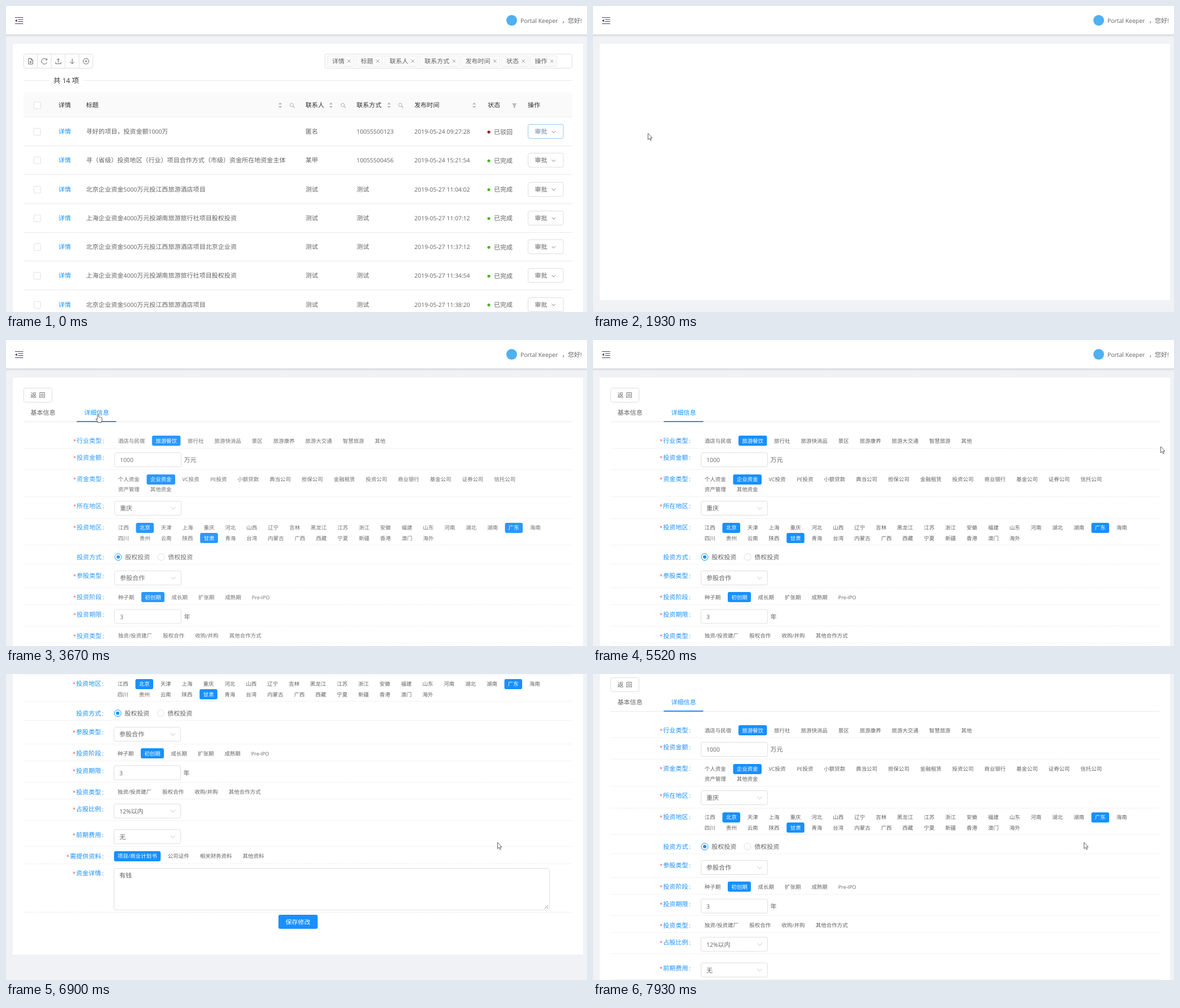
An HTML page that plays this animation: 1030x544 px, repeating every 8 s.

```html
<!DOCTYPE html>
<html lang="zh-CN">
<head>
<meta charset="utf-8">
<title>项目审批</title>
<style>
html, body { margin: 0; width: 100%; height: 100%; overflow: hidden; background: #f0f2f5; }
svg { display: block; width: 1030px; height: 544px; }
text { font-family: "Open Sans", "Noto Sans CJK SC", "Noto Sans CJK", sans-serif; text-rendering: geometricPrecision; white-space: pre; }
</style>
</head>
<body>
<svg id="stage" viewBox="0 0 1030 544" xmlns="http://www.w3.org/2000/svg"></svg>
<script>
const LOOP = 8000;
const BLUE = '#1890ff', INK = '#636363', DARK = '#303030', EDGE = '#dedede', LINE = '#e9e9e9';
const BASE = 11.06, SMALL = 9.48, LATIN = 0.945;

// y is the vertical middle of the text; Latin runs are set a little smaller than Chinese
function text(x, y, s, fill = INK, size = BASE, extra = '') {
  const runs = s.replace(/[!-~]+( [!-~]+)*/g, run => `<tspan font-size="${(size * LATIN).toFixed(2)}">${run}</tspan>`);
  return `<text x="${x}" y="${(y + size * 0.37).toFixed(2)}" font-size="${size}" fill="${fill}" ${extra}>${runs}</text>`;
}
const box = (x, y, w, h, fill = '#fff', stroke = EDGE, r = 3, extra = '') =>
  `<rect x="${x}" y="${y}" width="${w}" height="${h}" rx="${r}" fill="${fill}" stroke="${stroke}" ${extra}/>`;
const path = (d, stroke = INK, width = 1, extra = '') =>
  `<path d="${d}" fill="none" stroke="${stroke}" stroke-width="${width}" ${extra}/>`;
const at = (x, y, s) => `<g transform="translate(${x} ${y})">${s}</g>`;
const hline = (y, x1 = 31, x2 = 1004, color = LINE, extra = '') => path(`M${x1} ${y}H${x2}`, color, 1, extra);
const chevron = (x, y, color = '#c4c4c4', r = 4) =>
  path(`M${x - r} ${y - r / 2}l${r} ${r * 1.1}l${r} ${-r * 1.1}`, color, 1);
const checkbox = y => box(49.5, y, 12, 12, '#fff', '#e2e2e2', 1.5);

function header() {
  const bars = path('M16 20.5H30.5M21.5 24H30.5M21.5 27.5H30.5M16 31.5H30.5', '#4a3d55', 1.2) +
    '<path d="M16 26l3.6 -2.6v5.2z" fill="#4a3d55"/>';
  return '<rect y="50" width="1030" height="5" fill="url(#shade)"/>' +
    '<rect width="1030" height="50.5" fill="#fff"/>' + bars +
    '<circle cx="896.5" cy="25.5" r="9.5" fill="#4fb0f2"/>' +
    text(912, 25.5, 'Portal Keeper') + text(985.5, 25.5, '，') + text(996, 25.5, '您好!');
}

function toolbar() {
  const icons = [
    path('M-3.5 -5H1L4 -2V5H-3.5ZM1 -5V-2H4M-1.8 1.4H2.2M.2 -.6V3.4'),
    path('M4 -2.8A5 5 0 1 0 4.6 2M4.6 -5V-2.2H1.8'),
    path('M0 2.5V-4.5M-2.6 -2L0 -4.6L2.6 -2M-4.7 1.5V4.5H4.7V1.5'),
    path('M0 -4.5V4.5M-3.8 .8L0 4.6L3.8 .8'),
    path('M-1.9 -1.9L1.9 1.9M1.9 -1.9L-1.9 1.9') + `<circle r="5" fill="none" stroke="${INK}"/>`
  ];
  return box(31.5, 85.5, 122.5, 25) + icons.map((icon, i) =>
    (i ? path(`M${31 + i * 24.6} 85.5V110.5`, EDGE) : '') + at(43.5 + i * 24.6, 98.2, icon)).join('');
}

function columnPicker() {
  const tags = [['详情', 569], ['标题', 620], ['联系人', 671], ['联系方式', 733], ['发布时间', 805.5], ['状态', 878], ['操作', 928.5]];
  return box(565.5, 85.5, 438, 25) + tags.map(([s, x]) => {
    const w = s.length * BASE + 25.5;
    return box(x + .5, 88.5, w, 19, '#fafafa', '#ececec', 2) + text(x + 8.9, 98.3, s) +
      at(x + w - 8.5, 98, path('M-2.6 -2.6L2.6 2.6M2.6 -2.6L-2.6 2.6', '#888', .9));
  }).join('');
}

function tableHead() {
  const heads = [['详情', 93], ['标题', 142], ['联系人', 531], ['联系方式', 621.5], ['发布时间', 724], ['状态', 854], ['操作', 925]];
  const sorter = x => `<path d="M${x - 3.3} 175l3.3 -3.6l3.3 3.6zM${x - 3.3} 178l3.3 3.6l3.3 -3.6z" fill="#bbb"/>`;
  const search = x => `<circle cx="${x - 1}" cy="175.8" r="3" fill="none" stroke="#b0b0b0"/>` + path(`M${x + 1.2} 178l3 3`, '#b0b0b0', 1.1);
  return '<rect x="31" y="154" width="973" height="43" rx="3" fill="#fafafa"/>' + hline(197) + checkbox(170.5) +
    heads.map(([s, x]) => text(x, 176.3, s, DARK)).join('') +
    [486, 576, 679, 830].map(sorter).join('') + [507.5, 598, 700].map(search).join('') +
    '<path d="M897 173h8.6l-2.8 4.2v3.8h-3v-3.8z" fill="#bbb"/>';
}

function tableRow([title, person, phone, date], i) {
  const y = 223 + i * 51.25, done = i > 0;
  const top = Math.round(y - 13) + .5;
  return checkbox(Math.round(y - 6) + .5) + text(93, y, '详情', BLUE) + text(142, y, title) +
    text(531, y, person) + text(621.5, y, phone) + text(724, y, date) +
    `<circle cx="856" cy="${y + 1}" r="2.6" fill="${done ? '#4fb324' : '#8b1f1f'}"/>` +
    text(865, y + .5, done ? '已完成' : '已驳回') +
    box(925.5, top, 62.5, 25, '#fff', EDGE, 3, done ? '' : 'id="firstBtn"') +
    text(937.5, y, '审批', INK, BASE, done ? '' : 'id="firstTxt"') + chevron(970.8, y + .7, '#808080', 3.2) +
    hline(Math.round(y + 25) + .5);
}

function listPage() {
  const jx = '北京企业资金5000万元投江西旅游酒店项目', hn = '上海企业资金4000万元投湖南旅游旅行社项目股权投资';
  const test = (title, time) => [title, '测试', '测试', '2019-05-27 ' + time];
  const rows = [
    ['寻好的项目，投资金额1000万', '匿名', '10055500123', '2019-05-24 09:27:28'],
    ['寻（省级）投资地区（行业）项目合作方式（市级）资金所在地资金主体', '某甲', '10055500456', '2019-05-24 15:21:54'],
    test(jx, '11:04:02'), test(hn, '11:07:12'), test(jx + '北京企业资', '11:37:12'), test(hn, '11:34:54'), test(jx, '11:38:20')
  ];
  return toolbar() + columnPicker() + hline(132.5, 31, 77) + hline(132.5, 138, 1004) +
    text(84, 132.5, '共 14 项', DARK, 12.64, 'font-weight="500"') + tableHead() + rows.map(tableRow).join('');
}

const EM = { V: .62, C: .62, P: .56, E: .51, '/': .39 };
const tagWidth = s => [...s].reduce((w, c) => w + (EM[c] || 1) * SMALL, 0);

// "*" marks a chosen tag
function tags(y, list) {
  let x = 197.8;
  return list.split(' ').map(item => {
    const on = item[0] === '*', s = item.replace('*', ''), w = tagWidth(s), left = x;
    x += w + 18.96;
    return (on ? box(left - 6.3, Math.round(y - 9), w + 12.6, 18, BLUE, 'none') : '') + text(left, y, s, on ? '#fff' : INK, SMALL);
  }).join('');
}

function label(y, s, need = true) {
  const x = 124.3 - (s.length - 4) * BASE;
  return (need ? text(x - 6, y + .6, '*', '#f5474c', 9.6) : '') + text(x, y, s, BLUE) + text(170.3, y, ':', BLUE);
}

const field = (y, s, unit = '') => box(191.5, y - 12.5, 118, 25) +
  text(201, y + .3, s) + (unit ? text(314.5, y, unit) : '');
const select = (y, s) => field(y, s) + chevron(295.5, y);

function form() {
  const labels = { 行业类型: 179, 投资金额: 209, 资金类型: 247, 所在地区: 295, 投资地区: 333, 投资方式: 385.5, 参股类型: 419,
    投资阶段: 457, 投资期限: 488, 投资类型: 525.5, 占股比例: 555.8, 前期费用: 601.5, 需提供资料: 639.5, 资金详情: 670 };
  const rules = [192, 230, 278, 317, 364, 398, 440, 470, 508, 538, 576, 622, 653, 739];
  const radio = (x, color, s) => `<circle cx="${x}" cy="385.8" r="6" fill="#fff" stroke="${color}"/>` + text(x + 12.2, 385.8, s);
  return rules.map(y => hline(y + .5, 31, 1004, LINE, 'stroke-dasharray="2 1.6"')).join('') +
    Object.entries(labels).map(([s, y]) => label(y, s, s !== '投资方式')).join('') +
    tags(179, '酒店与民宿 *旅游餐饮 旅行社 旅游快消品 景区 旅游康养 旅游大交通 智慧旅游 其他') +
    field(213, '1000', '万元') +
    tags(247.5, '个人资金 *企业资金 VC投资 PE投资 小额贷款 典当公司 担保公司 金融租赁 投资公司 商业银行 基金公司 证券公司 信托公司') +
    tags(265.5, '资产管理 其他资金') + select(299, '重庆') +
    tags(333.8, '江西 *北京 天津 上海 重庆 河北 山西 辽宁 吉林 黑龙江 江苏 浙江 安徽 福建 山东 河南 湖北 湖南 *广东 海南') +
    tags(352, '四川 贵州 云南 陕西 *甘肃 青海 台湾 内蒙古 广西 西藏 宁夏 新疆 香港 澳门 海外') +
    radio(198, BLUE, '股权投资') + `<circle cx="198" cy="385.8" r="3" fill="${BLUE}"/>` + radio(274, EDGE, '债权投资') +
    select(423, '参股合作') + tags(457, '种子期 *初创期 成长期 扩张期 成熟期 Pre-IPO') + field(491.5, '3', '年') +
    tags(525.8, '独资/投资建厂 股权合作 收购/并购 其他合作方式') + select(559.5, '12%以内') + select(605.2, '无') +
    tags(639.8, '*项目/商业计划书 公司证件 相关财务资料 其他资料') +
    box(191.5, 661.5, 772, 74) + text(201, 674, '有钱') + path('M955 733l6 -6M959 733l2 -2', '#777', .9) +
    box(483, 744, 69.5, 25, BLUE, 'none') + text(495.5, 756.5, '保存修改', '#fff');
}

function detailPage() {
  return box(31.5, 85.5, 50, 25) + text(43.2, 98.3, '返') + text(58.6, 98.3, '回') + hline(145.5) +
    text(43.5, 128.8, '基本信息', INK, BASE, 'id="tabA"') + text(138.5, 128.8, '详细信息', INK, BASE, 'id="tabB"') +
    `<rect id="inkBar" y="144" width="70" height="2" fill="${BLUE}"/>` +
    `<g clip-path="url(#pane)"><g id="form">${form()}</g></g>`;
}

const cursorStyle = 'fill="#fff" stroke="#3a3a3a" stroke-width=".8" stroke-linejoin="round"';
const stage = document.getElementById('stage');
stage.innerHTML = `<defs>
  <linearGradient id="shade" x2="0" y2="1"><stop stop-color="#cfd2d6"/><stop offset="1" stop-color="#f0f2f5"/></linearGradient>
  <clipPath id="pane"><rect x="31" y="147" width="974" height="640"/></clipPath></defs>
  <rect width="1030" height="544" fill="#f0f2f5"/>
  <g id="page"><rect id="panel" x="12" y="67" width="1011" fill="#fff"/>${header()}
  <g id="list">${listPage()}</g><g id="detail">${detailPage()}</g></g>
  <g id="cursor"><path id="arrow" d="M.5 .5V11.6L3 9.2L4.8 13L6.5 12.2L4.8 8.5H8Z" ${cursorStyle}/>
  <path id="hand" d="M-1 8V.8Q0 -1 1.2 .8V5Q2.4 4 3.4 5.4Q4.6 4.6 5.4 6Q6.8 5.4 7.2 7V10.5Q7 12 6 13V14.8H-.2V13.4L-3.8 8.8Q-3.4 6.8 -1 9.2Z" ${cursorStyle}/></g>`;

const el = {};
stage.querySelectorAll('[id]').forEach(n => el[n.id] = n);
const set = (n, attrs) => { for (const k in attrs) n.setAttribute(k, attrs[k]); };
const show = (n, on) => n.setAttribute('visibility', on ? 'visible' : 'hidden');

const clamp = p => Math.max(0, Math.min(1, p));
const smooth = p => p * p * (3 - 2 * p);
const cubic = p => p < .5 ? 4 * p ** 3 : 1 - 4 * (1 - p) ** 3;
const between = (t, a, b) => t >= a && t < b;

// keys: [time, value, ...]
function track(keys, t) {
  const i = keys.findIndex(k => k[0] > t);
  if (i === 0) return keys[0].slice(1);
  if (i < 0) return keys[keys.length - 1].slice(1);
  const a = keys[i - 1], b = keys[i], p = (t - a[0]) / (b[0] - a[0]);
  return a.slice(1).map((v, j) => v + (b[j + 1] - v) * p);
}

const MOUSE = [[450, 919, 523], [800, 520, 400], [1230, 95, 257], [1400, 97, 226], [2340, 97, 226], [3190, 163, 132],
  [4070, 163, 132], [4300, 520, 215], [4450, 830, 245], [4590, 1017, 225], [5130, 1022, 175], [5220, 1022, 175],
  [5480, 1006, 189], [5540, 1006, 189], [5900, 966, 241], [6330, 966, 241], [6850, 871, 299], [7380, 871, 299], [7500, 870, 299]];
const SCROLL = [[5900, 0], [6060, 79], [6200, 156], [6290, 158], [6330, 158], [6600, 237], [6900, 316],
  [7320, 316], [7500, 237], [7700, 158], [7920, 79]];

function draw(t) {
  const onDetail = t >= 2010, switched = t >= 3250, settled = t >= 3880;
  set(el.page, { transform: `translate(0 ${-Math.round(track(SCROLL, t)[0])})` });
  set(el.panel, { height: t < 1850 ? 477 : switched ? 748 : 456 });

  show(el.list, t < 1900);
  set(el.list, { opacity: 1 - smooth(clamp((t - 1450) / 430)) });
  set(el.firstBtn, { stroke: t < 70 ? '#94c8f0' : EDGE });
  set(el.firstTxt, { fill: t < 70 ? '#6a8298' : INK });

  const p = cubic(clamp((t - 3250) / 449));
  const shift = settled ? 0 : Math.max(1, 973 * (1 - p));
  show(el.detail, onDetail);
  show(el.form, onDetail && switched);
  set(el.form, { transform: `translate(${shift.toFixed(2)} 0)`, opacity: settled ? 1 : .92 * clamp((t - 3250) / 400) });
  set(el.inkBar, { x: 31 + 94.5 * p });
  set(el.tabA, { fill: switched ? INK : BLUE });
  set(el.tabB, { fill: t >= 3100 ? BLUE : INK });

  const [x, y] = track(MOUSE, t);
  const hand = between(t, 1330, 1880) || between(t, 3080, 4110);
  const seen = between(t, 450, 4590) || between(t, 5140, 5210) || t >= 5520;
  set(el.cursor, { transform: `translate(${x.toFixed(2)} ${y.toFixed(2)})` });
  show(el.arrow, seen && !hand);
  show(el.hand, seen && hand);
}

const start = performance.now();
function tick() {
  draw((performance.now() - start) % LOOP);
  requestAnimationFrame(tick);
}
tick();
</script>
</body>
</html>
```
